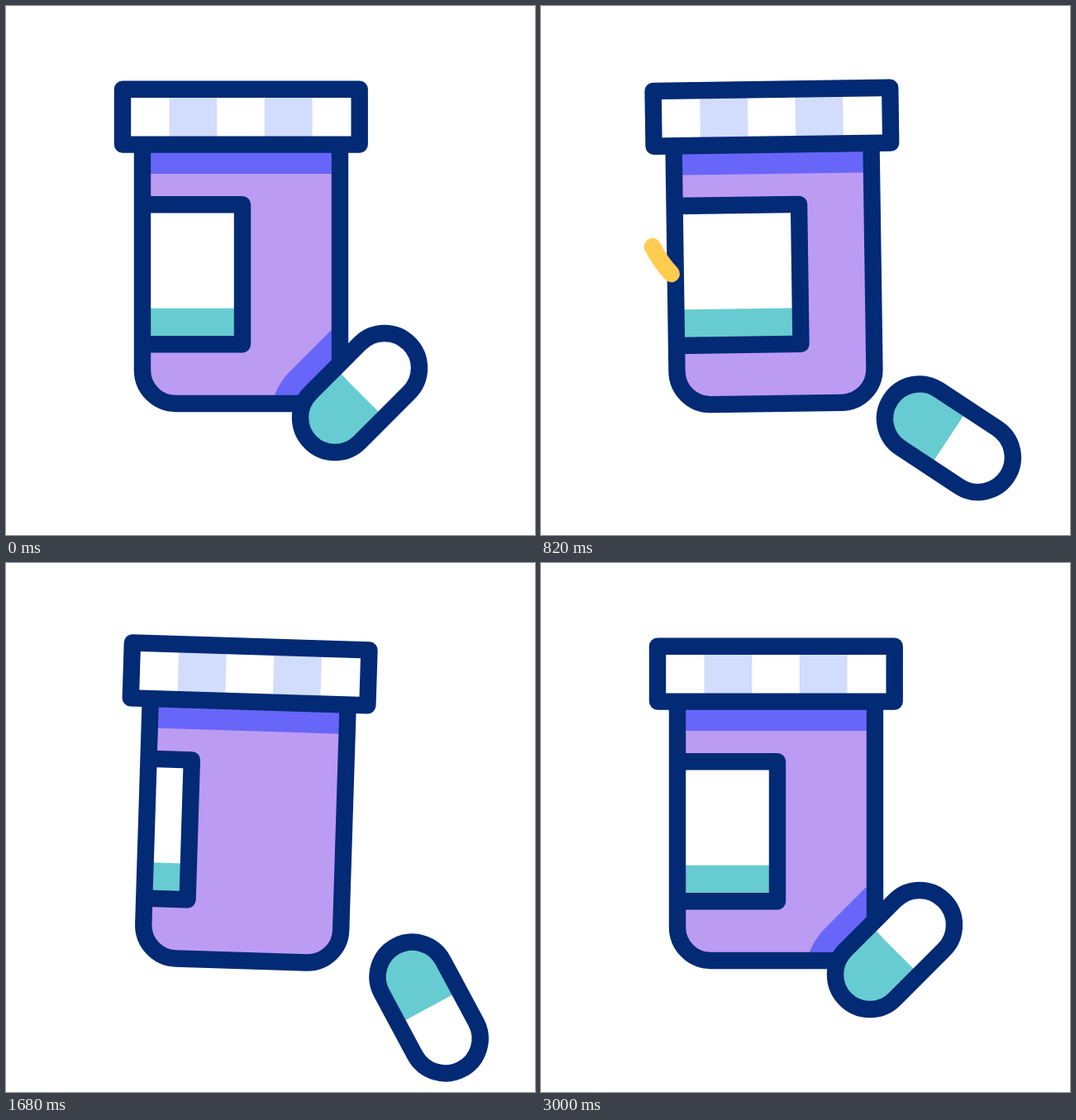
Write an HTML page with a canvas that moves like this. It is 640 px wide and 640 px high and loops after 3600 ms.

```html
<!DOCTYPE html>
<html lang="en">
<head>
<meta charset="utf-8">
<title>Pill bottle</title>
<style>
  html, body { margin: 0; width: 100%; height: 100%; overflow: hidden; background: #fff; }
  canvas { display: block; width: 100vw; height: 100vh; }
</style>
</head>
<body>
<canvas id="stage" width="640" height="640"></canvas>
<script>
const ctx = document.getElementById('stage').getContext('2d');
const LOOP = 3600;
const RAD = Math.PI / 180;
const NAVY = '#022a75', LILAC = '#bc9bf3', VIOLET = '#6866f9', TEAL = '#67ccd1',
      PALE = '#d2dcfc', YELLOW = '#ffcc50', WHITE = '#fff';

// Keyframes as [time, value]; the curve rests at every turning point.
const tilt = [[0, 0], [575, -18.1], [990, 9], [1300, -4.3], [1600, 2.5], [1830, 0]];
const roll = [[0, -45], [1435, 84], [2470, -72], [3000, -45]];
const slide = [[0, 0], [1210, 1], [1600, 1], [2340, 0]];
const TURN = 580, LABEL_W = 160;
const labelEdge = [[0, 286], [580, 222], [820, 315], [1140, 530], [1680, 217 + TURN],
                   [2000, 296 + TURN], [2100, 300 + TURN], [2560, 286 + TURN]];

const swooshes = [
  { x: 320, y: 238, from: 159.3, to: 45, head: [705, 1230], tail: [915, 1435] },
  { x: 338, y: 322, from: 97, to: 60, head: [1020, 1320], tail: [1180, 1480] }
];

function slope(keys, i) {
  if (i === 0 || i === keys.length - 1) return 0;
  const rate = j => (keys[j + 1][1] - keys[j][1]) / (keys[j + 1][0] - keys[j][0]);
  const a = rate(i - 1), b = rate(i);
  return a * b > 0 ? 2 * a * b / (a + b) : 0;
}

function track(keys, t) {
  const last = keys.length - 1;
  if (t <= keys[0][0]) return keys[0][1];
  if (t >= keys[last][0]) return keys[last][1];
  let i = 0;
  while (t >= keys[i + 1][0]) i++;
  const [t0, v0] = keys[i], [t1, v1] = keys[i + 1];
  const d = t1 - t0, s = (t - t0) / d, r = 1 - s;
  return v0 * r * r * (1 + 2 * s) + v1 * s * s * (3 - 2 * s)
    + d * s * r * (slope(keys, i) * r - slope(keys, i + 1) * s);
}

function rect(color, x, y, w, h) {
  ctx.fillStyle = color;
  ctx.fillRect(x, y, w, h);
}

function outline(path, color = NAVY) {
  ctx.strokeStyle = color;
  ctx.lineWidth = 20.4;
  ctx.stroke(path);
}

function bodyPath() {
  const p = new Path2D();
  p.moveTo(165, 160);
  p.lineTo(165, 440);
  p.arc(205.5, 440.5, 40.5, Math.PI, Math.PI / 2, true);
  p.lineTo(363.5, 481);
  p.arc(363.5, 440.5, 40.5, Math.PI / 2, 0, true);
  p.lineTo(404, 160);
  return p;
}

function capsule(r) {
  const p = new Path2D(), half = 42.4;
  p.arc(-half, 0, r, Math.PI / 2, Math.PI * 1.5);
  p.arc(half, 0, r, -Math.PI / 2, Math.PI / 2);
  p.closePath();
  return p;
}

const body = bodyPath();
const lid = new Path2D();
lid.rect(141, 100.8, 286.7, 66.8);
const pill = capsule(42), shade = capsule(78);

function tiltBottle(t) {
  ctx.translate(284.5, 480);
  ctx.rotate(track(tilt, t) * RAD);
  ctx.translate(-284.5, -480);
}

function placePill(t) {
  const k = track(slide, t);
  ctx.translate(428 + 86.5 * k, 468 + 72.4 * k);
  ctx.rotate(track(roll, t) * RAD);
}

function drawLabel(right) {
  const left = right - LABEL_W;
  if (right < 140 || left > 430) return;
  rect(WHITE, left, 240, LABEL_W, 169);
  rect(TEAL, left, 365.7, LABEL_W, 43);
  const frame = new Path2D();
  frame.rect(left, 240.3, LABEL_W, 169);
  outline(frame);
}

function drawBottle(t) {
  ctx.save();
  tiltBottle(t);
  ctx.save();
  ctx.clip(body);
  rect(LILAC, 160, 160, 250, 325);
  rect(VIOLET, 160, 160, 250, 43);
  const edge = track(labelEdge, t);
  drawLabel(edge);
  drawLabel(edge - TURN);
  ctx.restore();

  // The pill's shadow falls only inside the bottle.
  ctx.save();
  ctx.clip(body);
  ctx.setTransform(1, 0, 0, 1, 0, 0);
  placePill(t);
  ctx.fillStyle = VIOLET;
  ctx.fill(shade);
  ctx.restore();

  outline(body);
  rect(WHITE, 141, 101, 286, 66);
  rect(PALE, 197.5, 101, 57.7, 66);
  rect(PALE, 312.8, 101, 57.7, 66);
  outline(lid);
  ctx.restore();
}

function drawSwoosh(s, t) {
  const at = ([a, b]) => track([[a, s.from], [b, s.to]], t);
  const head = at(s.head), tail = at(s.tail);
  if (tail - head < 0.05) return;
  const p = new Path2D();
  p.ellipse(s.x, s.y, 198, 150, 0, tail * RAD, head * RAD, true);
  outline(p, YELLOW);
}

function drawPill(t) {
  ctx.save();
  placePill(t);
  ctx.save();
  ctx.clip(pill);
  rect(TEAL, -90, -50, 90, 100);
  rect(WHITE, 0, -50, 90, 100);
  ctx.restore();
  outline(pill);
  ctx.restore();
}

function draw(t) {
  ctx.setTransform(1, 0, 0, 1, 0, 0);
  rect(WHITE, 0, 0, 640, 640);
  ctx.lineJoin = ctx.lineCap = 'round';
  drawBottle(t);
  swooshes.forEach(s => drawSwoosh(s, t));
  drawPill(t);
}

const start = performance.now();
function tick() {
  draw((performance.now() - start) % LOOP);
  requestAnimationFrame(tick);
}
tick();
</script>
</body>
</html>
```
